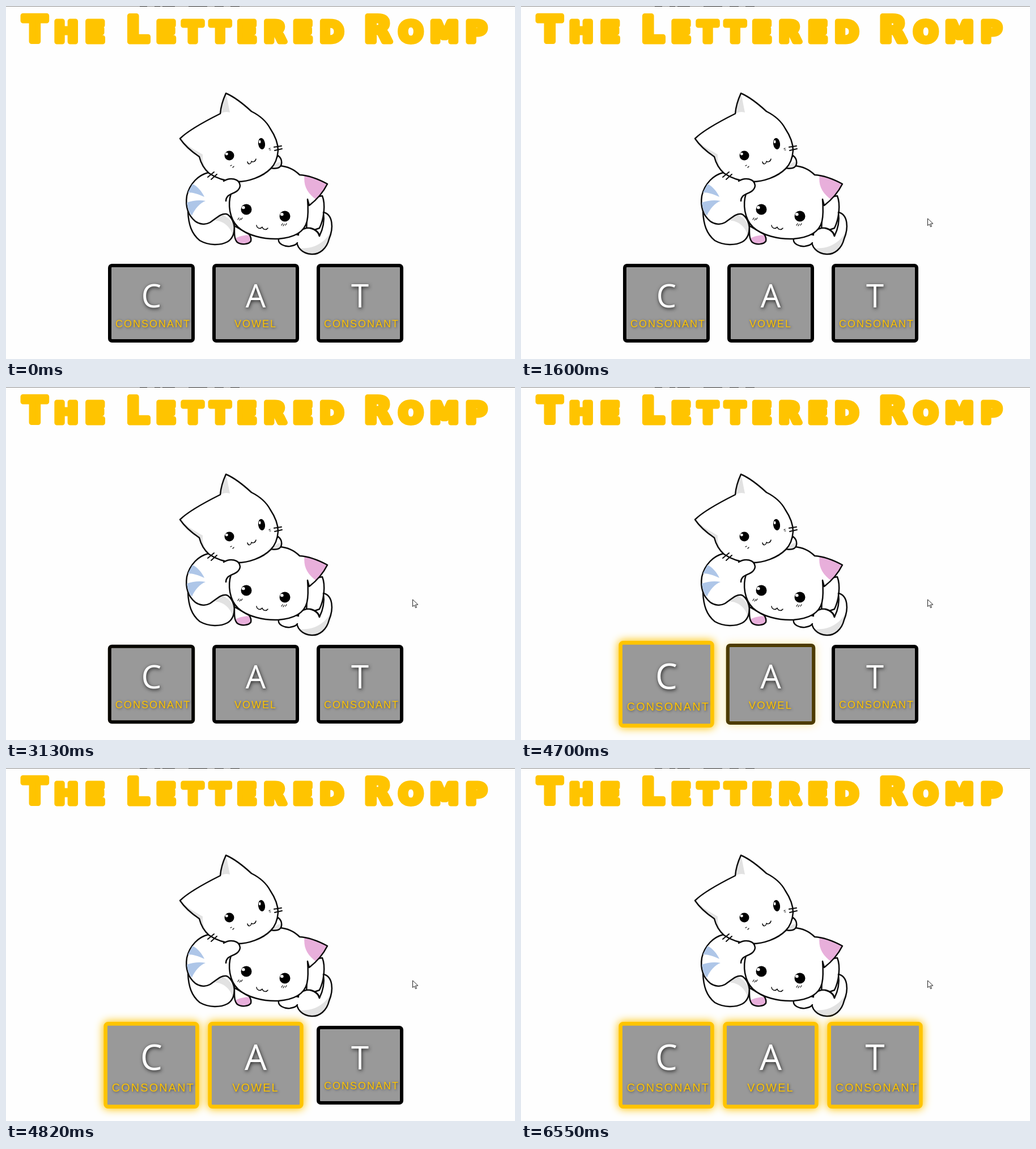
These frames come from a looping animation (898 px wide and 623 px high, 8000 ms). An HTML page with a canvas:

```html
<!DOCTYPE html>
<html lang="en">
<head>
<meta charset="utf-8">
<title>The Lettered Romp</title>
<style>
  html, body { margin: 0; width: 100%; height: 100%; overflow: hidden; background: #fefefe; }
  canvas { position: absolute; left: 0; top: 0; }
  .tile {
    position: absolute; top: 455px; width: 153px; height: 139px;
    box-sizing: border-box; border: 6px solid #000; border-radius: 7px;
    background: #999;
  }
  .tile b, .tile span { position: absolute; white-space: nowrap; }
  .tile b {
    left: 0; right: 0; top: 19px; text-align: center;
    font: 400 56px/60px "Open Sans", "Noto Sans", sans-serif;
    color: #fff; text-shadow: 1px 2px 6px #222;
  }
  .tile span {
    left: 7px; width: 127px; top: 90px; text-align: center;
    font: 18px/20px "Liberation Sans", Arial, sans-serif;
    letter-spacing: 2px; color: #ffc400; text-shadow: 1px 1px 4px #444;
  }
</style>
</head>
<body>
<canvas id="stage" width="898" height="623"></canvas>
<script>
const LOOP = 8000, GOLD = "#ffc400", INK = "#0b0b0b", SHADE = "#e2e2e2", PINK = "#e8afdb", BLUE = "#aec6e8";
const ctx = document.getElementById("stage").getContext("2d");

// letter, label, [time, progress] steps of the highlight
const tiles = [
  ["C", "CONSONANT", [[3130, 0.03], [3250, 1]]],
  ["A", "VOWEL", [[4700, 0.3], [4820, 1]]],
  ["T", "CONSONANT", [[6410, 0.98], [6550, 1]]]
].map(([letter, label, steps], i) => {
  const el = document.createElement("div");
  el.className = "tile";
  el.style.left = 180 + 184 * i + "px";
  el.innerHTML = `<b>${letter}</b><span>${label}</span>`;
  document.body.append(el);
  return { el, steps };
});

// pointer tip: time, x, y
const trail = [
  [500, 770, 592], [620, 815, 555], [740, 856, 510], [860, 884, 474],
  [1000, 850, 438], [1120, 775, 382], [1240, 702, 342],
  [1360, 671, 332], [1480, 698, 359], [1600, 717, 375]
];

function shape(d, fill, line = INK, width = 2.5) {
  const p = new Path2D(d);
  if (fill) { ctx.fillStyle = fill; ctx.fill(p); }
  if (line) { ctx.strokeStyle = line; ctx.lineWidth = width; ctx.stroke(p); }
}

const line = (d, width = 1.5) => shape(d, null, INK, width);

function shaded(d, shade, color = SHADE) {
  shape(d, "#fff", null);
  ctx.save();
  ctx.clip(new Path2D(d));
  shape(shade, color, null);
  ctx.restore();
  shape(d, null);
}

function oval(x, y, rx, ry, color, turn = 0) {
  ctx.beginPath();
  ctx.ellipse(x, y, rx, ry, turn, 0, 7);
  ctx.fillStyle = color;
  ctx.fill();
}

function eye(x, y, rx, ry, turn) {
  oval(x, y, rx, ry, "#000", turn);
  oval(x - rx * 0.55, y - ry * 0.35, rx * 0.3, ry * 0.28, "#fff");
}

function lowerCat() {
  // back, tail and feet
  shape("M532 342 C542 338 552 336 558 335 C564 350 561 376 553 392 L530 400Z", "#fff");
  shaded("M560 364 C577 368 578 392 570 411 C566 428 553 439 539 438 C523 437 511 426 513 410 C515 397 526 390 537 392 C546 394 552 400 553 406 C560 392 562 378 560 364Z",
    "M510 425 C530 432 560 424 573 398 L580 445 L510 445Z");
  line("M553 406 C552 400 546 394 537 392", 2.5);
  shape("M516 404 C505 400 487 403 481 411 C479 420 492 425 501 424 C508 423 512 421 514 418", "#fff");
  shaded("M403 388 C403 400 402 411 408 417 C415 422 428 421 432 415 C433 410 432 407 429 403Z",
    "M402 412 C410 406 420 404 436 404 L434 425 L402 424Z", PINK);
  // head
  shaded("M397 331 C391 350 394 375 409 390 C425 405 455 412 480 411 C506 409 526 400 531 380 C534 367 533 354 532 341 L535 352 C548 342 560 328 567 314 C552 306 535 299 518 298 C510 290 500 283 482 282 C450 284 415 295 397 331Z",
    "M527 296 C524 315 530 330 548 342 L570 314Z", PINK);
  eye(424, 359, 9.5, 9.5);
  eye(492, 371, 9.5, 9.5);
  line("M442 387 C443 393 449 394 452 390 C454 396 460 395 462 392");
  line("M409 377 L411 374 M412 378 L414 375 M415 377 L417 374 M486 387 L488 384 M489 388 L491 385 M493 387 L495 384", 1.2);
}

function upperCat() {
  // haunch, body and stripes
  shaded("M321 363 C322 385 327 402 342 414 C358 423 378 423 391 416 C399 411 403 402 403 390 L398 372 L375 368Z",
    "M362 378 C382 378 394 386 402 408 L410 365 L375 362Z");
  shape("M357 294 C340 298 324 313 319 335 C316 355 322 370 334 380 C341 385 351 387 360 382 C371 374 386 358 402 388 C394 372 391 350 397 331 L410 310Z", "#fff", null);
  line("M357 294 C340 298 324 313 319 335 C316 355 322 370 334 380 C341 385 351 387 360 382 C372 374 379 366 388 367 C394 368 399 376 403 386", 2.5);
  shape("M329 314 C338 318 346 328 350 337 C340 332 330 329 321 329Z", BLUE, null);
  shape("M319 347 C330 343 342 342 352 344 C342 348 333 358 328 370 C322 363 320 355 319 347Z", BLUE, null);
}

function upperHead() {
  shaded("M480 264 C488 270 489 283 479 286 C474 287 469 287 464 285Z", "M464 287 L480 276 L488 274 L484 290Z");
  const head = "M307 234 C322 219 352 203 378 190 C379 177 383 165 388 154 C402 160 420 174 433 186 C447 193 459 203 466 216 C476 231 480 243 480 255 C479 269 475 279 467 287 C453 301 428 311 404 310 C388 309 371 304 358 295 C350 288 344 278 341 266 C329 258 315 246 307 234Z";
  shaded(head, "M305 232 C320 248 335 255 347 262 C346 276 351 286 361 297 L335 285Z M378 190 L388 152 L395 188 C389 186 384 187 378 190Z");
  eye(394, 264, 8.5, 8.5);
  eye(451, 243, 6, 10, -0.15);
  line("M426 275 C427 280 432 280 433 274 C435 276 440 275 441 270");
  line("M396 282 L398 281 M400 285 L402 283 M464 252 L466 251 M465 254 L467 254", 1.2);
  line("M356 302 L367 293 M362 306 L372 297 M473 249 L486 247 M474 255 L487 252", 2);
  // arm over the other cat
  shape("M384 309 C395 302 412 304 413 317 C412 329 397 330 392 335 C389 338 388 341 388 344 L380 330Z", "#fff", null);
  line("M384 309 C395 302 412 304 413 317 C412 329 397 330 392 335 C389 338 388 341 388 344", 2.5);
}

function word(text, mid) {
  const parts = [[text[0], 62], [text.slice(1).toUpperCase(), 50]];
  const gap = 13;
  const setFont = size => {
    ctx.font = `bold ${size}px "DejaVu Sans", sans-serif`;
    ctx.letterSpacing = gap + "px";
  };
  const widths = parts.map(([s, size]) => { setFont(size); return ctx.measureText(s).width; });
  let x = mid - (widths[0] + widths[1] - gap) / 2;
  parts.forEach(([s, size], i) => {
    setFont(size);
    ctx.fillStyle = ctx.strokeStyle = GOLD;
    ctx.lineWidth = 9;
    ctx.fillText(s, x, 63);
    ctx.strokeText(s, x, 63);
    x += widths[i];
  });
}

function topEdge() {
  ctx.fillStyle = "#8c8c8c";
  ctx.fillRect(0, 0, 898, 1);
  ctx.fillStyle = "#222";
  for (const [x, w] of [[236, 13], [262, 10], [276, 22], [322, 33], [368, 16], [396, 16]]) ctx.fillRect(x, 0, w, 1);
}

function pointer(x, y) {
  ctx.save();
  ctx.translate(x + 0.5, y + 0.5);
  shape("M0 0 L0 12 L3 9.5 L5.2 14.2 L7 13.4 L5 8.8 L9 8.6Z", "#fff", "#222", 1);
  ctx.restore();
}

const latest = (steps, t) => steps.filter(s => s[0] <= t).pop();

function paint() {
  ctx.fillStyle = "#fefefe";
  ctx.fillRect(0, 0, 898, 623);
  ctx.lineJoin = ctx.lineCap = "round";
  topEdge();
  word("The", 102);
  word("Lettered", 404);
  word("Romp", 740);
  upperCat();
  lowerCat();
  upperHead();
}

function frame() {
  const t = performance.now() % LOOP;
  paint();
  const spot = latest(trail, t);
  if (spot) pointer(spot[1], spot[2]);
  for (const { el, steps } of tiles) {
    const step = latest(steps, t), p = step ? step[1] : 0;
    el.style.transform = p ? `scale(${1 + 0.1 * p})` : "none";
    el.style.borderColor = `rgb(${255 * p}, ${196 * p}, 0)`;
    el.style.boxShadow = p ? `0 0 14px 1px rgba(255, 196, 0, ${p})` : "none";
  }
  requestAnimationFrame(frame);
}
frame();
</script>
</body>
</html>
```
